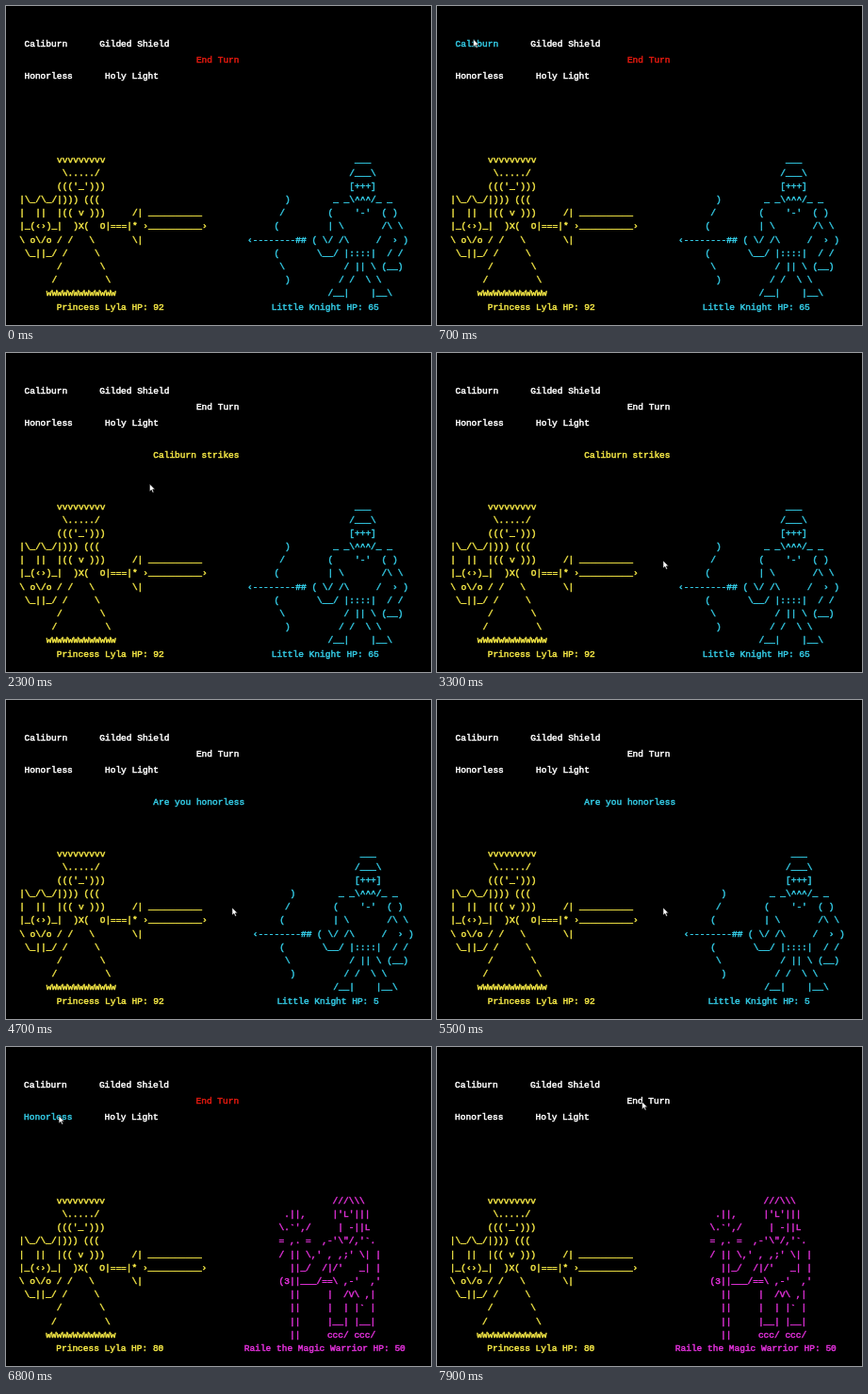
An HTML page that plays this animation: 451 px wide and 338 px high, repeating every 8000 ms.

```html
<!DOCTYPE html>
<html lang="en">
<head>
<meta charset="utf-8">
<title>Duel</title>
<style>
  html, body { margin: 0; width: 100%; height: 100%; overflow: hidden; background: #000; }
  svg { display: block; width: 100%; height: 100%; }
  text {
    font: 9.5px "Liberation Mono", "DejaVu Sans Mono", monospace;
    white-space: pre;
    stroke-width: .5px;
  }
</style>
</head>
<body>
<svg id="stage" viewBox="0 0 451 338"></svg>
<script>
const LOOP = 8000, CHAR = 5.7, ROW = 14.18, LEFT = 13.8, TOP = 165.5;
const WHITE = '#ffffff', RED = '#e0190f', YELLOW = '#f2e545', CYAN = '#33c8e2', MAGENTA = '#e030d8';

// "~" stands for a backtick, angle brackets are drawn as small chevrons
const glyphs = { '~': '`', '<': '‹', '>': '›' };
const lines = art => art.replace(/[~<>]/g, c => glyphs[c]).split('\n').slice(1);

const princess = [String.raw`
       vvvvvvvvv
        \...../
       ((('_')))
|\_/\_/|))) (((
|  ||  |(( v )))     /| __________
|_(<>)_|  )X(  O|===|* >__________>
\ o\/o / /   \       \|
 \_||_/ /     \
       /       \
      /         \
     wWwWwWwWwWwWw`, String.raw`
       vvvvvvvvv
        \...../
       ((('_')))
        ))) (((
|\_/\_/|(( v )))
|  ||  |  )X(        /| __________
|_(<>)_| /   \ O|===|* >__________>
\ o\/o //     \      \|
 \_||_//       \
      /         \
     wWwWwWwWwWwWw`].map(lines);

const knight = [String.raw`
                    ___
                   /___\
                   [+++]
       )        _ _\^^^/_ _
      /        (    '-'  ( )
     (         | \       /\ \
<--------## ( \/ /\     /  > )
     (       \__/ |::::|  / /
      \           / || \ (__)
       )         / /  \ \
               /__|    |__\ `, String.raw`
                    ___
                   /___\
       )           [+++]
      /         _ _\^^^/_ _
     (         (    '-'  ( )
<--------## ( \/ \       /\ \
     (       \__/ \     /  > )
      \           |::::|  / /
       )          / || \ (__)
                 / /  \ \
               /__|    |__\ `].map(lines);

const mage = [String.raw`
          ///\\\
 .||,     |'L'|||
\.~',/     | -||L
= ,. =  ,-'\"/,'~.
/ || \,' , ,;' \| |
  ||_/  /|/'   _| |
(3||___/==\ ,-'  ,'
  ||     |  /V\ ,|
  ||     |  | |~ |
  ||     |__| |__|
  ||     ccc/ ccc/`].map(lines);

const stage = document.getElementById('stage');
const node = (name, attrs, parent = stage) => {
  const el = document.createElementNS('http://www.w3.org/2000/svg', name);
  for (const key in attrs) el.setAttribute(key, attrs[key]);
  return parent.appendChild(el);
};
const paint = (el, color) => {
  el.setAttribute('fill', color);
  el.setAttribute('stroke', color);
};
const write = (el, text) => { if (el.textContent !== text) el.textContent = text; };
const show = (el, on) => el.setAttribute('visibility', on ? 'inherit' : 'hidden');

const scene = node('g', {});
const label = (text, col, y, color = WHITE) => {
  const el = node('text', { x: LEFT + col * CHAR, y }, scene);
  paint(el, color);
  el.textContent = text;
  return el;
};

function fighter(x, color, poses) {
  const group = node('g', {}, scene);
  paint(group, color);
  const body = node('g', {}, group);
  const rows = poses[0].map((_, i) => node('text', { x, y: TOP + i * ROW }, body));
  const caption = node('text', { y: 322 }, group);
  return {
    group,
    update(pose, text, captionCol, shift = 0) {
      rows.forEach((row, i) => write(row, poses[pose][i]));
      body.setAttribute('transform', `translate(${shift * CHAR} 0)`);
      caption.setAttribute('x', LEFT + captionCol * CHAR);
      write(caption, text);
    }
  };
}

const buttons = [
  ['Caliburn', 1, 42.8], ['Gilded Shield', 15, 42.8],
  ['Honorless', 1, 76.8], ['Holy Light', 16, 76.8]
].map(([text, col, y]) => ({ col, y, size: text.length, el: label(text, col, y) }));
const endTurn = { col: 33, y: 59.8, size: 8, el: label('End Turn', 33, 59.8) };
const message = label('', 25, 110.8);

const hero = fighter(14.2, YELLOW, princess);
const guard = fighter(256, CYAN, knight);
const caster = fighter(290, MAGENTA, mage);

const cursor = node('path', {
  d: 'M0 0V8L1.9 6.3 3.2 9.2 4.5 8.6 3.2 5.8H5.7Z',
  fill: WHITE, stroke: '#000', 'stroke-width': .5
}, scene);

// time, x, y of the pointer
const route = [
  [200, 8, 32], [800, 41, 35.5], [1950, 41, 35.5], [2600, 240, 220],
  [6300, 240, 220], [6700, 56.5, 72.5], [7150, 56.5, 72.5], [7600, 218, 57.5], [LOOP, 218, 57.5]
];
function pointer(t) {
  const i = Math.max(1, route.findIndex(point => t < point[0]));
  const [t0, x0, y0] = route[i - 1], [t1, x1, y1] = route[i];
  const p = Math.max(0, (t - t0) / (t1 - t0));
  const e = p * p * (3 - 2 * p);
  return [x0 + (x1 - x0) * e, y0 + (y1 - y0) * e];
}

function render(t) {
  const duel2 = t >= 6300;
  const choosing = t < 2000 || duel2;
  const pose = t >= 1000 && t < 1900 ? 1 : 0;
  const wounded = t >= 3800;
  const [x, y] = pointer(t);
  const over = b => choosing && t >= 200 && y > b.y - 9 && y < b.y + 3 &&
    x > LEFT + b.col * CHAR && x < LEFT + (b.col + b.size) * CHAR;

  show(scene, t < 6100 || duel2);
  scene.setAttribute('transform', duel2 ? 'translate(-.4 .4)' : '');
  buttons.forEach(b => paint(b.el, over(b) ? CYAN : WHITE));
  paint(endTurn.el, choosing && !over(endTurn) ? RED : WHITE);

  const heroSpeaks = t >= 2100 && t < 3800;
  const guardSpeaks = t >= 4100 && t < 5600;
  write(message, heroSpeaks ? 'Caliburn strikes' : guardSpeaks ? 'Are you honorless' : '');
  paint(message, heroSpeaks ? YELLOW : CYAN);

  hero.update(pose, 'Princess Lyla HP: ' + (t < 5600 ? 92 : 80), 7);
  guard.update(pose, 'Little Knight HP: ' + (wounded ? 5 : 65), wounded ? 48 : 47, wounded ? 1 : 0);
  caster.update(0, 'Raile the Magic Warrior HP: 50', 42);
  show(guard.group, !duel2);
  show(caster.group, duel2);

  show(cursor, t >= 200);
  cursor.setAttribute('transform', `translate(${x} ${y})`);
}

const start = performance.now();
function tick() {
  render((performance.now() - start) % LOOP);
  requestAnimationFrame(tick);
}
tick();
</script>
</body>
</html>
```
